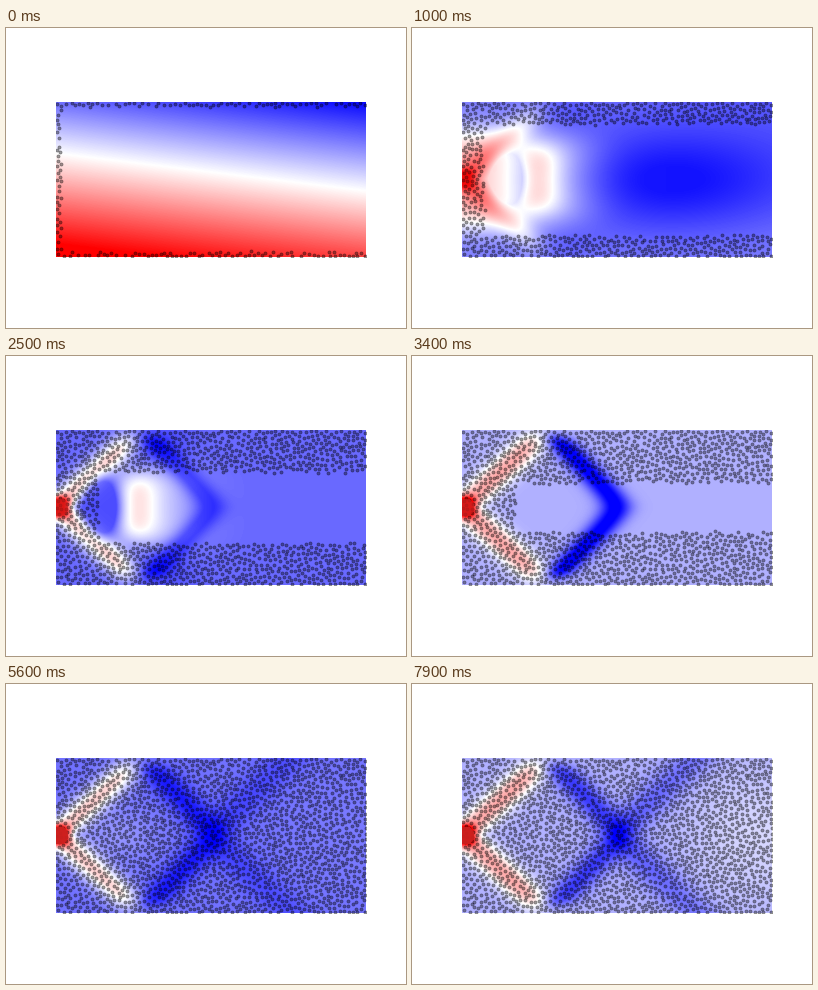
A matplotlib script for the animation above (8000 ms loop, 400 by 300 pixels).

```python
import numpy as np
import matplotlib.pyplot as plt
from matplotlib.animation import FuncAnimation
from matplotlib.patches import Polygon

FRAMES, STEP = 80, 100
W, H = 310, 155
rng = np.random.default_rng(4)

X, Y = np.meshgrid(np.arange(W) + 0.5, np.arange(H) + 0.5)
D = np.abs(Y - H / 2)  # distance from the mid line


def bell(a, b=0, p=2, q=2):
    return np.exp(-np.abs(a) ** p - np.abs(b) ** q)


def sigmoid(a):
    return 1 / (1 + np.exp(-a))


def arms(width):
    """Two bars leaving the load point on the left wall."""
    across = (D - 0.9 * X) / 1.345
    along = (X + 0.9 * D) / 1.345
    return bell(across / width) * sigmoid((101 - along) / 7)


def load():
    return bell(X / 14, D / 11, 3, 3)


def start():
    return 0.5 + (Y - 52 - 0.12 * X) / 180


def lobes():
    v = 0.36 - 0.12 * (X / W) * (1 - Y / H)
    v = v - 0.34 * bell((X - 205) / 134, (Y - 80) / 54)
    return v + 0.67 * bell((X - 12) / 72, D / 51, 2, 4)


def crescent():
    v = 0.1 + 0.35 * bell((X - 80) / 22, D / 33, 2, 4)
    v = v + 0.32 * bell((X - 100) / 45, D / 42, 2, 4)
    v = v - 0.9 * bell((X - 46) / 16, D / 26)
    v = v - 0.1 * bell((X - 105) / 30, (D - 68) / 18)
    return v + 0.43 * arms(13) + 0.6 * load()


def truss(base, arm, leg, wing=0, width=16, inner=0, glow=0):
    bend = np.hypot(D, 10)
    legs = bell((X + bend - 163) / width)
    legs = legs * sigmoid((X - 84) / 4) * sigmoid((70 - D) / 3)
    wings = bell((D - 0.95 * (X - 153)) / 23) * sigmoid((X - 148) / 5)
    wings = wings * (1 - 0.3 * D / 77)
    v = base + inner * bell((X - 62) / 40, D / 26)
    v = v + glow * sigmoid((X - 240) / 18) * bell(D / 65)
    return v + arm * arms(13.5) + 0.6 * load() - leg * legs - wing * wings


KEYS = [0, 500, 1800, 3400, 4900, 6500, 7900]
FIELDS = np.clip([
    start(),
    lobes(),
    crescent(),
    truss(0.345, 0.32, 0.38),
    truss(0.14, 0.38, 0.14, 0.05, width=19, inner=0.12),
    truss(0.33, 0.33, 0.22, 0.16, width=20, glow=0.04),
    truss(0.345, 0.32, 0.23, 0.17, width=19, glow=0.08),
], 0, 1)


def field(t):
    i = min(np.searchsorted(KEYS, t, side="right") - 1, len(KEYS) - 2)
    f = (t - KEYS[i]) / (KEYS[i + 1] - KEYS[i])
    return FIELDS[i] * (1 - f) + FIELDS[i + 1] * f


def scatter_points(gap, tries):
    """Random points no closer together than gap."""
    pts = np.empty((4000, 2))
    n = 0
    for p in rng.uniform((0.5, 0.5), (W, H - 0.5), (tries, 2)):
        if n == 0 or ((pts[:n] - p) ** 2).sum(axis=1).min() > gap * gap:
            pts[n] = p
            n += 1
    return pts[:n]


points = scatter_points(3.7, 24000)
depth = np.minimum(points[:, 0], np.minimum(points[:, 1], H - points[:, 1]))
depth = depth + rng.normal(0, 0.5, len(depth))


def front(t):
    return np.interp(t, [0, 500, 1800, 3400, 4900, 5300], [5, 15, 34, 53, 74, 82])


def visible(t):
    return points[depth < front(t)]


def pad_alpha(t):
    return np.interp(t, [500, 1800, 4900], [0, 0.6, 0.95])


fig, ax = plt.subplots(figsize=(4, 3), dpi=100)
image = ax.imshow(field(0), cmap="bwr", vmin=0, vmax=1, extent=(0, W, H, 0))
dots = ax.scatter(*visible(0).T, s=5.2, color=(0, 0, 0, 0.38), linewidths=0.5)
pad = ax.add_patch(Polygon(
    [(0, 69), (8, 69), (12, 74), (12, 81), (8, 86), (0, 86)],
    facecolor=(0.8, 0.13, 0.12), alpha=0, zorder=3))
ax.set(xlim=(0, W), ylim=(H, 0))
ax.axis("off")


def update(i):
    t = i * STEP
    image.set_data(field(t))
    dots.set_offsets(visible(t))
    pad.set_alpha(pad_alpha(t))
    return image, dots, pad


anim = FuncAnimation(fig, update, frames=FRAMES, interval=STEP, repeat=True)
plt.show()
```
